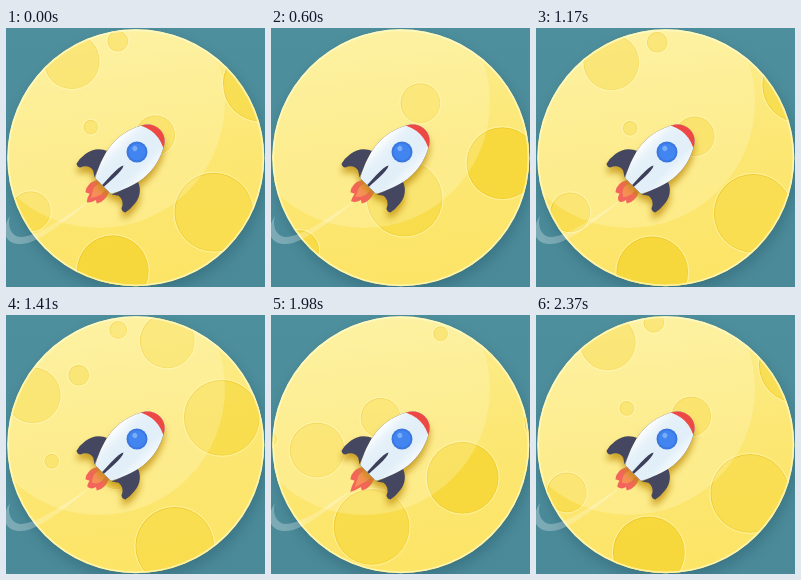
Write an HTML page with a canvas that moves like this. It is 259 px wide and 259 px high and loops after 2400 ms.

```html
<!DOCTYPE html>
<html lang="en">
<head>
<meta charset="utf-8">
<title>Rocket over the moon</title>
<style>
html, body { margin: 0; width: 100%; height: 100%; overflow: hidden; background: #4d8d9b; }
canvas { display: block; }
</style>
</head>
<body>
<canvas id="stage" width="259" height="259"></canvas>
<script>
const ctx = document.getElementById('stage').getContext('2d');
const LOOP = 2400;
const VX = -0.202, VY = 0.1915; // px per ms
const SECOND = [245.8, -222.9]; // where the second group of craters starts

// x, y, radius, depth of colour
const craters = [
  [66, 33, 28, .6], [112, 13, 10.5, .6], [85, 99, 7.5, .6], [149.5, 107, 20, .7],
  [255, 55.5, 38, .6], [208, 184, 39.5, .5], [25, 183, 20, .5], [107, 243, 36, .9]
];
const extras = [[200.5, -21.4, 27.5, .5], [151.5, -32.3, 9, .5]];

function disc(x, y, r) {
  ctx.beginPath();
  ctx.arc(x, y, r, 0, 2 * Math.PI);
}

function fillDisc(x, y, r, color) {
  disc(x, y, r);
  ctx.fillStyle = color;
  ctx.fill();
}

function strokeDisc(x, y, r, color) {
  disc(x, y, r);
  ctx.strokeStyle = color;
  ctx.stroke();
}

function fillPath(d, color) {
  ctx.fillStyle = color;
  ctx.fill(new Path2D(d));
}

function linear(x0, y0, x1, y1, ...colors) {
  const g = ctx.createLinearGradient(x0, y0, x1, y1);
  colors.forEach((c, i) => g.addColorStop(i / (colors.length - 1), c));
  return g;
}

function shadow(color, blur, x, y) {
  ctx.shadowColor = color;
  ctx.shadowBlur = blur;
  ctx.shadowOffsetX = x;
  ctx.shadowOffsetY = y;
}

function drawCraters(list, dx, dy) {
  for (const [cx, cy, r, depth] of list) {
    const x = cx + dx, y = cy + dy;
    fillDisc(x, y, r, `rgba(247,215,56,${depth})`);
    strokeDisc(x, y, r - .6, linear(x - r, y - r, x + r, y + r, 'rgba(232,190,30,.75)', 'rgba(240,205,50,.3)'));
    strokeDisc(x, y, r + .5, 'rgba(255,246,175,.75)');
  }
}

function drawMoon(t) {
  ctx.save();
  shadow('rgba(25,75,90,.35)', 14, 2, 6);
  fillDisc(129.8, 129.8, 128.5, linear(115, 0, 145, 258, '#fcee90', '#fce774', '#fce466'));
  ctx.restore();

  ctx.save();
  disc(129.8, 129.8, 128.5);
  ctx.clip();
  drawCraters(craters, VX * t, VY * t);
  drawCraters(craters, VX * (t - LOOP), VY * (t - LOOP));
  drawCraters(craters.concat(extras), VX * t + SECOND[0], VY * t + SECOND[1]);
  fillDisc(93, 74, 126, 'rgba(255,252,215,.25)');
  ctx.lineWidth = 2;
  strokeDisc(129.8, 129.8, 127.8, 'rgba(255,253,205,.7)');
  ctx.restore();
}

function drawTrail() {
  fillPath('M86 171 C62 191 40 209 22 215 C6 219 -3 211 -1 200 C0 194 2 191 4 188 ' +
    'C1 198 5 208 14 209 C28 210 60 189 86 171Z',
    linear(86, 171, 0, 205, 'rgba(255,255,255,.4)', 'rgba(255,255,255,.22)', 'rgba(255,255,255,.28)'));
}

function drawRocket(t) {
  const tip = 71 + 3 * Math.sin(t * 2 * Math.PI / 240);
  const sway = 1.2 * Math.sin(t * 2 * Math.PI / 160);
  const body = 'M0 -32 C7 -32 13 -28 16 -21 C23 -8 25 6 22 20 C19 32 15 41 11 48 L-11 48 ' +
    'C-15 41 -19 32 -22 20 C-25 6 -23 -8 -16 -21 C-13 -28 -7 -32 0 -32Z';
  const fin = 'M21 20 C29 23 34 29 35 38 Q36 45 34.5 51 Q32 53 29 51 Q26 43 18 44 L12 48 Q18 35 21 20Z';

  ctx.save();
  ctx.translate(131, 124);
  ctx.rotate(Math.PI / 4);

  fillPath(`M-8 47 Q-14 58 -8 65 L-4 63 Q-3 68 ${sway} ${tip} Q4 68 5 63 L8 65 Q13 57 8 47Z`, '#f3655a');
  fillPath(`M-4 48 Q-7 56 -3 60 L${sway} ${tip - 6} L3 60 Q6 54 4 48Z`, '#f88f58');

  ctx.save();
  shadow('rgba(190,140,10,.8)', 7, 0, 6);
  fillPath(body + fin + 'M-21 20 C-29 23 -34 29 -35 38 Q-36 45 -34.5 51 Q-32 53 -29 51 ' +
    'Q-26 43 -18 44 L-12 48 Q-18 35 -21 20Z', '#45465f');
  ctx.restore();

  ctx.save();
  ctx.clip(new Path2D(body));
  ctx.fillStyle = linear(-24, 0, 24, 0, '#ffffff', '#e6f1f9', '#e2eff8', '#e2eff8', '#f6fbfe');
  ctx.fillRect(-26, -33, 52, 84);
  fillPath('M-20 -19 Q0 -32 20 -19 V-36 H-20Z', '#ee4844');
  ctx.restore();

  fillPath('M0 19 Q2.2 22 1.9 35 L1.2 48 H-1.2 L-1.9 35 Q-2.2 22 0 19Z', '#3d3e5a');

  fillDisc(0, 0, 10.5, '#3a78e0');
  fillDisc(0, 0, 8.5, '#4285f0');
  fillDisc(-4, -1, 2.6, '#78adfa');
  ctx.restore();
}

function draw() {
  const t = performance.now() % LOOP;
  ctx.fillStyle = linear(0, 0, 0, 259, '#4e8f9d', '#4a8998');
  ctx.fillRect(0, 0, 259, 259);
  drawMoon(t);
  drawTrail();
  drawRocket(t);
  requestAnimationFrame(draw);
}
draw();
</script>
</body>
</html>
```
